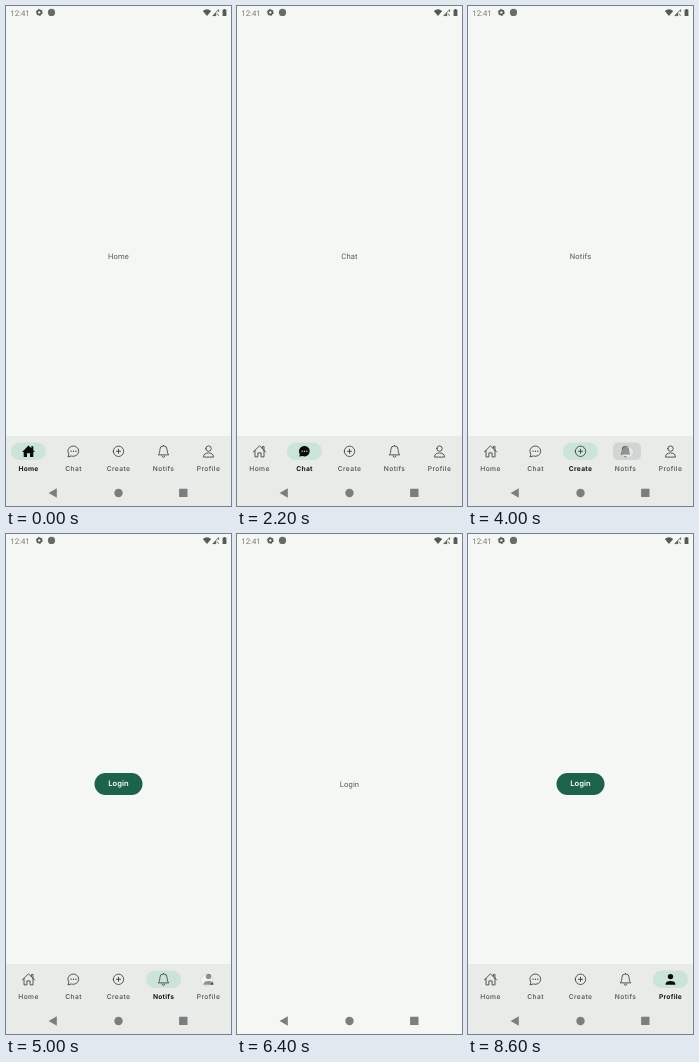
Write an HTML page that moves like this. It is 225 px wide and 500 px high and loops after 8700 ms.

```html
<!DOCTYPE html>
<html lang="en">
<head>
<meta charset="utf-8">
<title>Bottom navigation</title>
<style>
  html, body { margin: 0; width: 100%; height: 100%; overflow: hidden; background: #f4f7f4; }
  svg { display: block; width: 100vw; height: 100vh; }
  text { text-anchor: middle; text-rendering: geometricPrecision; }
  .label { font: 500 6.7px Inter, sans-serif; letter-spacing: .4px; fill: #4b504d; }
  .label.on { font-weight: 700; letter-spacing: .25px; fill: #151a17; }
  .body { font: 400 7.6px Roboto, sans-serif; letter-spacing: .14px; fill: #555a57; }
  .button { font: 600 7.6px Inter, sans-serif; letter-spacing: .05px; fill: #fff; }
  .clock { font: 400 7.8px Roboto, sans-serif; fill: #777a78; text-anchor: start; }
  .line { fill: none; stroke: #444946; stroke-width: .9; stroke-linejoin: round; stroke-linecap: round; }
</style>
</head>
<body>
<svg id="stage" viewBox="0 0 225 500" preserveAspectRatio="none">
  <defs><clipPath id="pill"><rect x="88.5" y="239" width="48" height="22" rx="11"/></clipPath></defs>
  <rect width="225" height="500" fill="#f4f7f4"/>

  <g fill="#555a57">
    <text class="clock" x="4.3" y="9.6">12:41</text>
    <circle cx="33.3" cy="6.4" r="2" fill="none" stroke="#555a57" stroke-width="1.6"/>
    <circle cx="33.3" cy="6.4" r="3" fill="none" stroke="#555a57" stroke-width="1" stroke-dasharray="1.6 1.54"/>
    <circle cx="45.5" cy="6.4" r="3.6" fill="#686c69"/>
    <path d="M196.8 4.9Q201 1.6 205.2 4.9L201 10Z"/>
    <path d="M206.8 9.6L212.6 3.6V6M206.8 9.6H210" fill="none" stroke="#555a57" stroke-width=".8"/>
    <path d="M207 9.8L210.2 6.4V9.8ZM211.2 7.4L213 9.6 212.4 10 210.8 7.8Z"/>
    <path d="M216.6 3.8H217.6V3H219.4V3.8H220.4V10H216.6Z"/>
  </g>

  <text id="body" class="body" x="112.5" y="253"></text>
  <g id="login">
    <rect x="88.5" y="239" width="48" height="22" rx="11" fill="#1d624c"/>
    <text class="button" x="112.5" y="252">Login</text>
    <circle id="buttonRipple" cx="115" cy="253" r="14.2" fill="#fff" opacity=".17" clip-path="url(#pill)"/>
  </g>
  <g id="bar"><rect y="430" width="225" height="70" fill="#e9ebe8"/></g>

  <rect id="backRipple" x="37" y="473.5" width="20.5" height="27" rx="10" fill="#dfe2df"/>
  <g fill="#7b7e7c">
    <path id="back" d="M42.6 487L50.8 482.2V491.8Z"/>
    <circle cx="112.5" cy="487" r="4.2"/>
    <rect x="173.1" y="482.7" width="8.4" height="8.4" rx=".4"/>
  </g>
  <circle id="dot" r="6" fill="#fff" stroke="#aaa" stroke-width=".6"/>
</svg>
<script>
const NS = 'http://www.w3.org/2000/svg';
const LOOP = 8700, STEP = 100, ROW = 445.3;
const $ = id => document.getElementById(id);

function add(parent, tag, attrs, text) {
  const el = document.createElementNS(NS, tag);
  set(el, attrs);
  if (text) el.textContent = text;
  parent.appendChild(el);
  return el;
}
function set(el, attrs) {
  for (const key in attrs) el.setAttribute(key, attrs[key]);
}
const show = (el, opacity) => set(el, { opacity: Number(opacity) });
const ring = (x, y, r) => `M${x - r} ${y}a${r} ${r} 0 1 0 ${2 * r} 0a${r} ${r} 0 1 0 ${-2 * r} 0Z`;

const bubble = 'M-5.4 5.3L-4.6 2.9A5.4 5.2 0 1 1-2 4.8Z';
const dots = [-2.4, 0, 2.4].map(x => ring(x, 0, .7)).join('');
const plus = 'M-2.4 0H2.4M0-2.4V2.4';
const bell = 'M-5 3.3C-3.6 2-3.8-.3-3.6-1.8A3.6 3.6 0 0 1 3.6-1.8C3.8-.3 3.6 2 5 3.3Z';
const clapper = 'M-1.4 4.6A1.4 1.4 0 0 0 1.4 4.6M0-5.4V-5.8';
const person = ring(0, -2.7, 2.7) + 'M-5 5.4C-5 2.7-2.9 1.7 0 1.7S5 2.7 5 5.4Z';

// outline, solid shape, detail strokes, detail dots
const tabs = [
  { name: 'Home',
    outline: 'M-6.2.7L0-5.5 6.2.7M-4.5-.9V5.6H-1.6V1.6H1.6V5.6H4.5V-.9M2.9-2.7V-4.9H4.5V-1',
    solid: 'M-6.4.7L0-5.8 2.8-3V-5H4.8V-1L6.4.7H4.8V5.8H1.5V2H-1.5V5.8H-4.8V.7Z' },
  { name: 'Chat', outline: bubble, solid: bubble, dots },
  { name: 'Create', outline: ring(0, 0, 5.2), solid: ring(0, 0, 5.6), strokes: plus },
  { name: 'Notifs', outline: bell + clapper, solid: bell + clapper },
  { name: 'Profile', outline: person, solid: person }
];

tabs.forEach((tab, i) => {
  const g = add($('bar'), 'g', { transform: `translate(${22.5 + 45 * i} ${ROW})` });
  tab.pill = add(g, 'rect', { x: -17.5, y: -8.8, width: 35, height: 17.6, rx: 8.8, fill: '#cce3d9' });
  tab.ripple = add(g, 'rect', { x: -12.5, y: -8.8, width: 28, height: 17.6, rx: 5, fill: '#d3d5d3' });
  tab.off = add(g, 'path', { d: tab.outline, class: 'line' });
  tab.on = add(g, 'path', { d: tab.solid });
  tab.marks = add(g, 'path', { d: tab.strokes || tab.dots || '', 'stroke-width': 1 });
  tab.label = add(g, 'text', { y: 19.7, class: 'label' }, tab.name);
});

const moves = [
  { at: 1800, from: 0, to: 1, ripple: 1 },
  { at: 2700, from: 1, to: 2, ripple: 1 },
  { at: 3900, from: 2, to: 3, ripple: 1 },
  { at: 4900, from: 3, to: 4, ripple: 0 }
];
const grow = [0, 0, .72, .94, 1];
const fade = [1, 1, .35, .08, 0];
const rippleFade = [.35, 1, .6, .25, 0];

function drawTabs(t) {
  const move = moves.filter(m => t >= m.at).pop();
  const step = move ? Math.min(4, (t - move.at) / STEP) : 4;
  const { from, to } = move || { from: -1, to: 0 };
  const iconTab = step < 1 ? from : to;
  const labelTab = step < 2 ? from : to;

  tabs.forEach((tab, i) => {
    const on = i === iconTab;
    const color = on && step < 2 ? '#444946' : '#080c0a';
    const cutout = on ? '#cce3d9' : '#444946';
    const size = i === to ? grow[step] : 1;
    show(tab.pill, i === to ? size > 0 : i === from ? fade[step] : 0);
    set(tab.pill, { transform: `scale(${size} 1)` });
    show(tab.ripple, move && i === to ? move.ripple * rippleFade[step] : 0);
    show(tab.off, !on);
    show(tab.on, on);
    set(tab.on, { fill: color });
    set(tab.marks, { stroke: tab.strokes ? cutout : 'none', fill: tab.dots ? cutout : 'none' });
    set(tab.label, { class: i === labelTab ? 'label on' : 'label' });
  });
  return { page: iconTab, to, step };
}

function touch(x, y, opacity) {
  set($('dot'), { cx: x, cy: y, opacity });
}

function draw(ms) {
  const t = Math.floor(ms % LOOP / STEP) * STEP;
  const { page, to, step } = drawTabs(t);
  const away = t < 6300 || t >= 8300 ? 0 : t === 6300 || t === 8200 ? .5 : 1;
  const profile = page === 4;

  $('body').textContent = profile ? 'Login' : tabs[page].name;
  show($('body'), profile ? away : 1);
  show($('login'), profile ? 1 - away : 0);
  show($('bar'), 1 - away);
  show($('buttonRipple'), t === 6200 ? .2 : t === 6300 ? .1 : 0);

  const backing = t < 8000 || t >= 8400 ? 0 : [1, .9, .6, .25][(t - 8000) / STEP];
  show($('backRipple'), backing);

  if (t === 6100 || t === 6200) touch(115, 255, .45);
  else if (t === 8000 || t === 8100) touch(51, 489, .6);
  else if (step < 2) touch(22.5 + 45 * to + (to === 4 ? -1.8 : 2), 446, .4);
  else touch(0, 0, 0);
}

function tick(now) {
  draw(now);
  requestAnimationFrame(tick);
}
draw(0);
requestAnimationFrame(tick);
</script>
</body>
</html>
```
